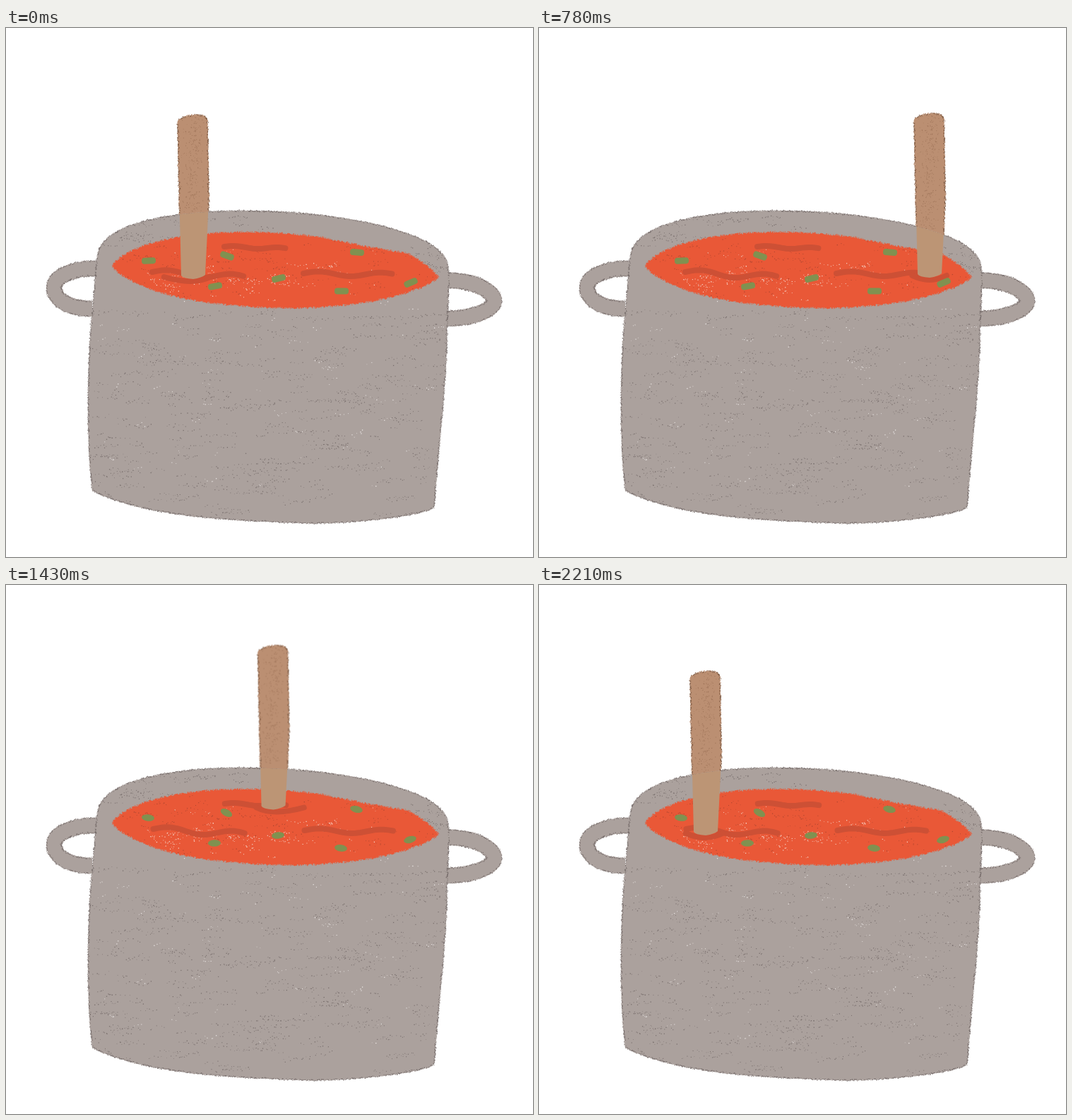
Animation of 746 by 750 pixels, one loop 2340 ms. Source, as an HTML page with a canvas:

```html
<!DOCTYPE html>
<html lang="en">
<head>
<meta charset="utf-8">
<title>Stirring the pot</title>
<style>
  html, body { margin: 0; width: 100%; height: 100%; overflow: hidden; background: #fff; }
  canvas { display: block; }
</style>
</head>
<body>
<canvas id="stage" width="746" height="750"></canvas>
<script>
const W = 746, H = 750, STEP = 130, STEPS = 18;
const GREY = '#aba19d', GREY_DARK = '#776d6b', RED = '#e95837', RED_DARK = '#a94530', WAVE = '#cd5035';
const WOOD = '#bb8f72', WOOD_DARK = '#7d5942', WOOD_WET = '#bc9575', GREEN = '#809150';

const POT = 'M130 322C135 275 245 258 340 259.5C455 259 615 285 625 335Q628 350 626 380L624 430' +
  'C624 500 612 590 606 679C592 691 500 702 430 702C330 698 200 695 123 656C114 600 115 480 122 405L127 350Q128 330 130 322Z';
const SOUP = 'M151 335C175 305 255 290 330 289C370 289 410 292 445 296Q510 311 568 319Q595 332 613 354' +
  'C570 385 470 398 400 397C310 396 200 385 151 340Z';
const HANDLES = ['M130 341C95 340 68 352 68 368C68 386 90 398 122 398', 'M624 358C660 357 691 372 691 387C691 402 655 412 624 412'];
const SPOON = 'M243 132Q246 127 262 124Q283 121 285 131L287 240L285 290L282 350Q277 354 265 356Q250 355 248 351L246 270Z';

// Key points of the stir: step, x, y
const KEYS = [[0, 0, 0], [2, 103, 18], [4, 207, 18], [6, 288, -2], [9, 190, -33], [12, 77, -37], [15, -14, -30], [17, -29, -1]];
// Herbs: x, y, tilt
const HERBS = [[202, 330, -.05], [313, 323, .35], [296, 366, -.18], [386, 355, -.25], [497, 318, .08], [475, 373, 0], [573, 361, -.42]];

let seed = 7;
const rnd = () => (seed = (seed * 16807) % 2147483647) / 2147483647;
const bell = () => rnd() + rnd() + rnd() - 1.5;

const key = i => {
  const n = KEYS.length, turn = Math.floor(i / n), [s, x, y] = KEYS[i - turn * n];
  return [s + turn * STEPS, x, y];
};

// Smooth closed path through the key points
function stir(step) {
  const s = (step + STEPS) % STEPS;
  const i = KEYS.findLastIndex(k => k[0] <= s);
  const [a, b, c, d] = [-1, 0, 1, 2].map(k => key(i + k));
  const span = c[0] - b[0], t = (s - b[0]) / span, ease = t * t * (3 - 2 * t);
  return [1, 2].map(k => {
    const v0 = (c[k] - a[k]) / (c[0] - a[0]), v1 = (d[k] - b[k]) / (d[0] - b[0]);
    return b[k] + (c[k] - b[k]) * ease + span * t * (1 - t) * (v0 * (1 - t) - v1 * t);
  });
}

function layer(paint) {
  const c = document.createElement('canvas');
  c.width = W; c.height = H;
  paint(c.getContext('2d'));
  return c;
}

function dot(g, color, x, y, size = 1) {
  g.fillStyle = color;
  g.fillRect(x - size / 2, y - size / 2, size, size);
}

// Crumbly crayon edge along a path, shifted sideways by offset
function crumble(g, d, colors, offset = 0, spread = 1.1) {
  const p = document.createElementNS('http://www.w3.org/2000/svg', 'path');
  p.setAttribute('d', d);
  const len = p.getTotalLength();
  for (let s = 0; s < len - 1; s += .8) {
    const a = p.getPointAtLength(s), b = p.getPointAtLength(s + 1);
    const n = offset + bell() * spread;
    dot(g, colors[rnd() * colors.length | 0], a.x - (b.y - a.y) * n, a.y + (b.x - a.x) * n, 1 + rnd() * .5);
  }
}

// Short horizontal streaks of grain inside a box
function streaks(g, color, count, x, y, w, h, length = 40) {
  for (let i = 0; i < count; i++) {
    const sx = x + rnd() * w, sy = y + rnd() * h, l = rnd() * length;
    for (let k = 0; k < l; k += 1 + rnd() * 7) dot(g, color, sx + k, sy + bell() * 3, .6 + rnd() * .7);
  }
}

const potPath = new Path2D(POT), soupPath = new Path2D(SOUP), spoonPath = new Path2D(SPOON);
const aroundPot = new Path2D(POT);
aroundPot.rect(0, 0, W, H);

const pot = layer(g => {
  const edge = [GREY, GREY_DARK];
  g.strokeStyle = GREY;
  g.lineWidth = 21.5;
  for (const d of HANDLES) {
    g.stroke(new Path2D(d));
    for (const side of [-10.5, 10.5]) crumble(g, d, edge, side);
  }
  g.fillStyle = GREY;
  g.fill(potPath);
  crumble(g, POT, edge);

  g.save();
  g.clip(potPath);
  streaks(g, GREY_DARK, 360, 105, 400, 510, 290);
  streaks(g, GREY_DARK, 45, 130, 268, 230, 45);
  streaks(g, GREY_DARK, 35, 565, 290, 55, 60, 20);
  streaks(g, '#eeeae8', 60, 125, 380, 490, 270, 20);
  g.restore();

  g.fillStyle = RED;
  g.fill(soupPath);
  crumble(g, SOUP, [RED, GREY], 0, .8);
  g.clip(soupPath);
  streaks(g, RED_DARK, 80, 160, 290, 440, 95, 24);
  streaks(g, '#f6d8cd', 30, 200, 315, 330, 70, 18);
  for (let x = 200; x < 470; x += 55) streaks(g, '#f6d8cd', 14, x, 318 + rnd() * 50, 50, 16, 18);
});

const drySpoon = layer(g => {
  g.fillStyle = WOOD;
  g.fill(spoonPath);
  crumble(g, SPOON, [WOOD, WOOD_DARK]);
  g.clip(spoonPath);
  for (let i = 0; i < 300; i++) dot(g, '#a0765b', 265 + bell() * 14, 126 + rnd() * 165, .6 + rnd() * .6);
});

const ctx = document.getElementById('stage').getContext('2d');
ctx.lineCap = ctx.lineJoin = 'round';

function wave(x, y, width, height, drop) {
  ctx.beginPath();
  for (let u = 0; u <= 1; u += .05)
    ctx.lineTo(x + u * width, y - height * Math.sin(u * 3 * Math.PI) + drop * u);
  ctx.stroke();
}

// Ripple under the spoon's foot, trailing behind its motion
function ripple(step) {
  const speed = stir(step + .5)[0] - stir(step - .5)[0];
  ctx.beginPath();
  ctx.moveTo(-24 - Math.max(0, speed) * .4, -2);
  ctx.quadraticCurveTo(0, 10, 24 - Math.min(0, speed) * .5, -2);
  ctx.stroke();
}

function herb([x, y, tilt], alternate) {
  ctx.save();
  ctx.translate(x - alternate, y);
  ctx.rotate(tilt + alternate * .15);
  ctx.beginPath();
  if (alternate) ctx.ellipse(0, 0, 9, 4.8, 0, 0, Math.PI * 2);
  else ctx.roundRect(-10, -4.5, 20, 9, 4);
  ctx.fill();
  ctx.restore();
}

function draw(step) {
  const [dx, dy] = stir(step);
  ctx.fillStyle = '#fff';
  ctx.fillRect(0, 0, W, H);
  ctx.drawImage(pot, 0, 0);

  const sway = 3 * (1 - Math.cos(step * Math.PI / 3));
  ctx.strokeStyle = WAVE;
  ctx.lineWidth = 8;
  wave(207 + sway, 346, 136, 4, 8);
  wave(309 + sway / 2, 310, 91, 1.5, 3);
  wave(421 + sway, 348, 132, 3, 2);

  ctx.save();
  ctx.clip(soupPath);
  ctx.translate(265 + dx, 355 + dy);
  ripple(step);
  ctx.restore();

  ctx.fillStyle = GREEN;
  for (const h of HERBS) herb(h, Number(step % 3 === 2));

  // Grainy wood above the rim, smooth wood in front of the pot
  ctx.save();
  ctx.clip(aroundPot, 'evenodd');
  ctx.drawImage(drySpoon, dx, dy);
  ctx.restore();
  ctx.save();
  ctx.clip(potPath);
  ctx.translate(dx, dy);
  ctx.fillStyle = WOOD_WET;
  ctx.fill(spoonPath);
  ctx.restore();
}

const start = performance.now();
let shown = 0;
draw(0);
requestAnimationFrame(function tick() {
  const step = Math.floor((performance.now() - start) / STEP) % STEPS;
  if (step !== shown) draw(shown = step);
  requestAnimationFrame(tick);
});
</script>
</body>
</html>
```
